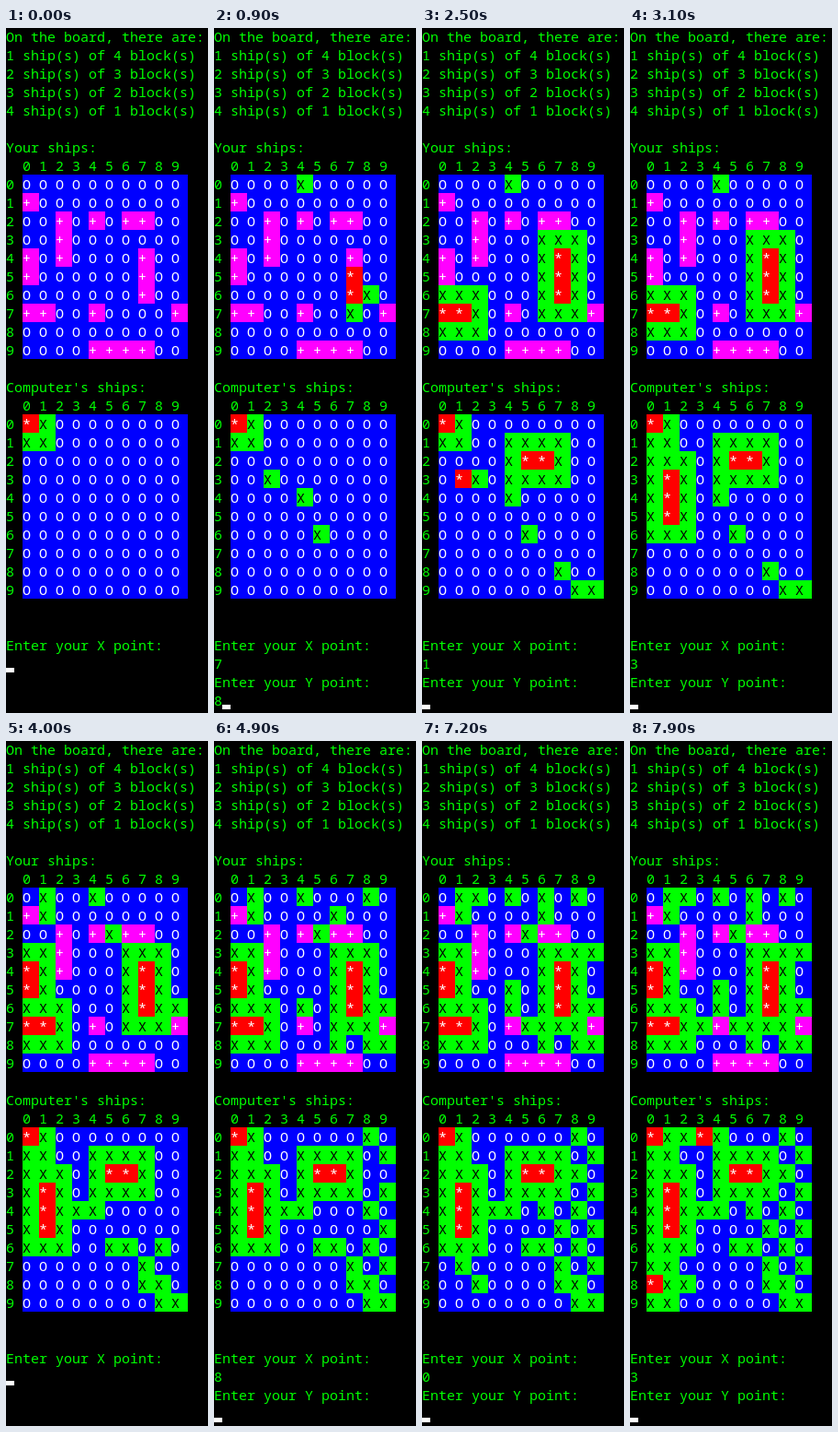
Recreate the animation shown at these times as an HTML page. Size 220 px wide and 743 px high, loop 8000 ms.

```html
<!DOCTYPE html>
<html lang="en">
<head>
<meta charset="utf-8">
<title>Battleship</title>
<style>
html, body { margin: 0; width: 100%; height: 100%; overflow: hidden; background: black; }
pre {
  position: absolute; left: 0; top: -1px; margin: 0;
  font: 15px/20px "Noto Sans Mono", "DejaVu Sans Mono", monospace;
  font-variant-ligatures: none; color: lime;
}
b { display: inline-block; width: 18px; height: 20px; vertical-align: top; font-weight: normal; color: white; background: blue; }
.ship { background: magenta; }
.hit { background: red; }
.miss { background: lime; color: black; }
#cursor { position: absolute; width: 9px; height: 5px; background: white; }
</style>
</head>
<body>
<pre id="screen"></pre>
<div id="cursor"></div>
<script>
const TICK = 100;
const terminal = document.getElementById('screen');
const cursor = document.getElementById('cursor');

const MINE = 'OOOOOOOOOO +OOOOOOOOO OO+O+O++OO OO+OOOOOOO +O+OOOO+OO ' +
             '+OOOOOO+OO OOOOOOO+OO ++OO+OOOO+ OOOOOOOOOO OOOO++++OO';
const THEIRS = '*XO+OOOOOO XXO+OOOOOO OOOOO++OOO O+OOOOOOOO O+OOOOOOOO ' +
               'O+OOOOOOOO OOOOOOOOOO OOOOOOOOOO +OOOOOOOOO OOOOOOOOOO';

// One letter per tick: x/y typed, p = prompt cleared, u = boards updated.
// Capitals and dashes hide the blinking cursor.
const SCRIPT = '.xyuxuxuxy' + 'uxyuxyuxUx' + 'yuxyuxyuxy' + 'uxuxuxuxux' +
               'uuxuuxuuux' + 'uxuxpu---x' + '.Y-UxyP-U.' + '..xuxuxuux';

// Each turn as xy cells: the player's shot, then the replies
const TURNS = ('23 40,44 76 86,56 75 77,78 74 18,99 17 27,52,62,89 07,13,14,15,' +
  '34 52,66 04 05,77 96,88 10,86 11,97 46,95 68,84 88,93 61,91 98,80 80,' +
  '82 60,64 57,75 93,17 45,28 20,08,30,40 37,20,31').split(',').map(turn => turn.split(' '));

const parse = text => text.split(' ').map(row => [...row]);

function around(x, y) {
  const cells = [];
  for (let j = y - 1; j <= y + 1; j++)
    for (let i = x - 1; i <= x + 1; i++) cells.push([i, j]);
  return cells;
}

function fire(grid, cell) {
  const [x, y] = [...cell].map(Number);
  if (grid[y][x] === 'O') grid[y][x] = 'X';
  if (grid[y][x] !== '+') return;
  grid[y][x] = '*';
  const ship = [[x, y]];
  for (const [cx, cy] of ship)
    for (const [i, j] of around(cx, cy)) {
      const block = ['+', '*'].includes(grid[j]?.[i]);
      const straight = i === cx || j === cy;
      if (block && straight && !ship.some(([a, b]) => a === i && b === j)) ship.push([i, j]);
    }
  if (ship.some(([a, b]) => grid[b][a] === '+')) return;
  // A sunk ship is ringed with misses
  for (const part of ship)
    for (const [i, j] of around(...part))
      if (grid[j]?.[i] === 'O') grid[j][i] = 'X';
}

const STYLE = { '+': 'ship', '*': 'hit', X: 'miss', O: '' };

function board(grid, hidden) {
  const rows = grid.map((row, y) => y + ' ' + row.map(c => {
    if (hidden && c === '+') c = 'O';
    return `<b class="${STYLE[c]}">${c} </b>`;
  }).join(''));
  return ['  ' + [...grid.keys()].join(' '), ...rows];
}

function draw(tick) {
  const mine = parse(MINE), theirs = parse(THEIRS);
  let turn = 0, typed = 0;
  for (const step of SCRIPT.slice(0, tick + 1).toLowerCase()) {
    if (step === 'x') typed = 1;
    if (step === 'y') typed = 2;
    if (step === 'p' || step === 'u') typed = 0;
    if (step === 'u') {
      const [shot, ...replies] = TURNS[turn++];
      fire(theirs, shot);
      replies.forEach(cell => fire(mine, cell));
    }
  }
  const prompt = ['Enter your X point:'];
  if (typed) {
    const [x, y] = TURNS[turn][0];
    prompt.push(x, 'Enter your Y point:', typed > 1 ? y : '');
  }
  terminal.innerHTML = [
    'On the board, there are:',
    ...[1, 2, 3, 4].map(n => `${n} ship(s) of ${5 - n} block(s)`),
    '', 'Your ships:', ...board(mine, false),
    '', "Computer's ships:", ...board(theirs, true),
    '', '', ...prompt
  ].join('\n');
  cursor.style.left = (typed > 1 ? 9 : 0) + 'px';
  cursor.style.top = (typed ? 734 : 694) + 'px';
  cursor.hidden = /[A-Z-]/.test(SCRIPT[tick]);
}

let last = -1;
function frame() {
  const tick = Math.floor(performance.now() / TICK) % SCRIPT.length;
  if (tick !== last) draw(last = tick);
  requestAnimationFrame(frame);
}
frame();
</script>
</body>
</html>
```
